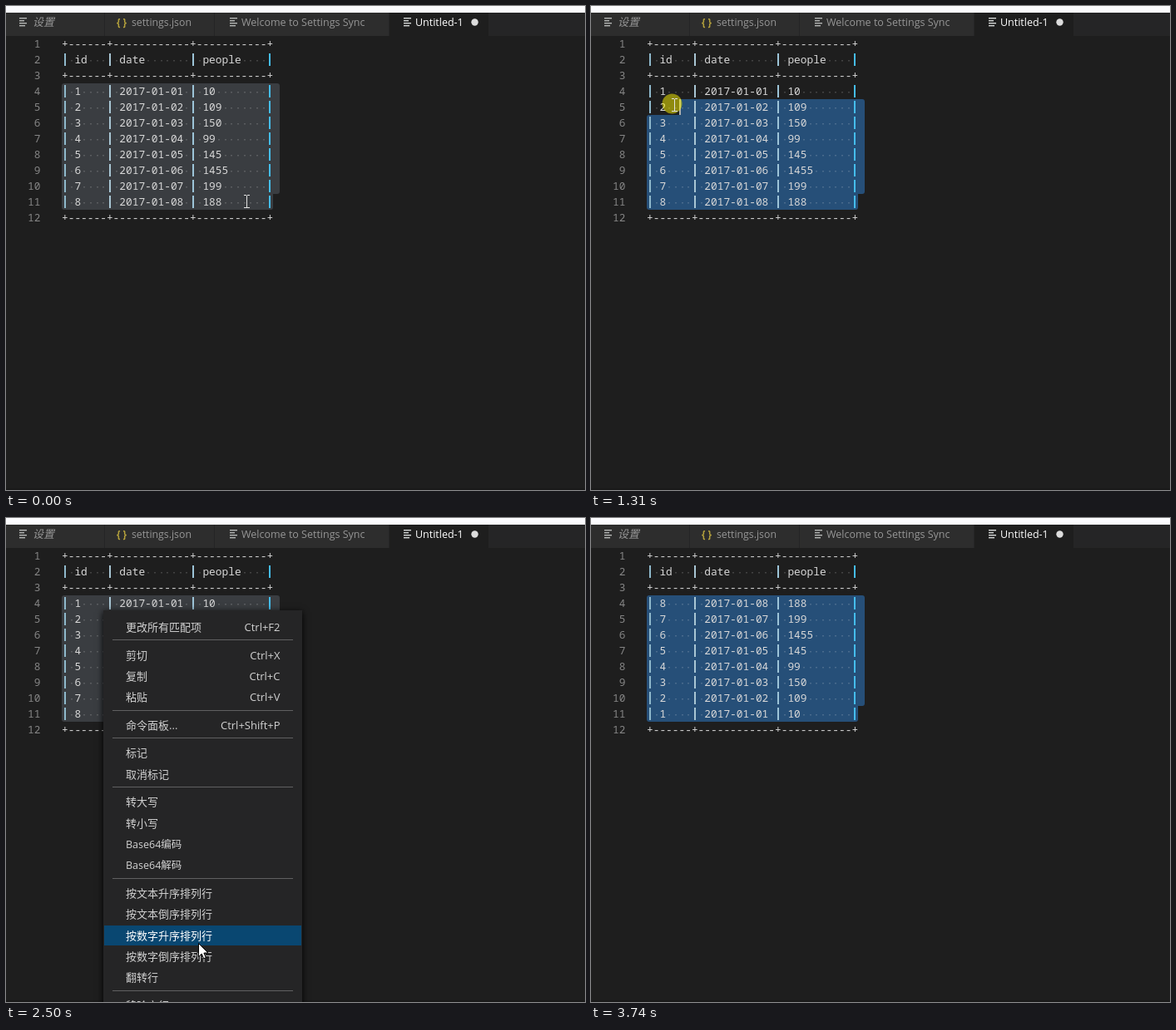
Animation of 696x582 px, one loop 3900 ms. Source, as an HTML page with a canvas:

```html
<!DOCTYPE html>
<html lang="zh">
<head>
<meta charset="utf-8">
<title>Sorting lines</title>
<style>
  html, body { margin: 0; width: 100%; height: 100%; overflow: hidden; background: #1e1e1e; }
  canvas { display: block; }
</style>
</head>
<body>
<canvas id="stage" width="696" height="582"></canvas>
<script>
const ctx = document.getElementById('stage').getContext('2d');
const LOOP = 3900, LEFT = 67, TOP = 36, CHAR = 7.7, LINE = 19, LAST = 11, END = 33;
const MONO = '12.83px "Noto Sans Mono", "DejaVu Sans Mono", monospace';
const ui = (size, style = '') =>
  `${style} ${size}px "Open Sans", "Noto Sans CJK SC", "Noto Sans CJK", sans-serif`;

const people = [10, 109, 150, 99, 145, 1455, 199, 188];
const rule = '+------+------------+-----------+';
const row = (id, date, n) => `| ${id.padEnd(5)}| ${date.padEnd(11)}| ${n.padEnd(10)}|`;
const data = people.map((n, i) => row(`${i + 1}`, `2017-01-0${i + 1}`, `${n}`));
const page = rows => [rule, row('id', 'date', 'people'), rule, ...rows, rule];
const ascending = page(data), reversed = page([...data].reverse());
const barColors = { 0: '#8fb9cc', 7: '#a9c6d4', 20: '#9dc4d8', 32: '#45bdec' };

const menuGroups = [
  [['更改所有匹配项', 'Ctrl+F2']],
  [['剪切', 'Ctrl+X'], ['复制', 'Ctrl+C'], ['粘贴', 'Ctrl+V']],
  [['命令面板...', 'Ctrl+Shift+P']],
  [['标记'], ['取消标记']],
  [['转大写'], ['转小写'], ['Base64编码'], ['Base64解码']],
  [['按文本升序排列行'], ['按文本倒序排列行'], ['按数字升序排列行'], ['按数字倒序排列行'], ['翻转行']],
  [['移除空行']]
];

// Each step changes only the listed parts. from/caret: [line, column]; at: pointer.
const steps = [
  [0, { at: [289, 235], kind: 'beam', ring: false, from: [4, 0], blue: false, caret: null, menu: false, text: ascending }],
  [70, { at: [285, 231] }],
  [220, { at: [326, 243] }],
  [300, { at: [360, 247], ring: true, from: null, caret: [12, END] }],
  [460, { at: [346, 238], ring: false }],
  [530, { at: [337, 232] }],
  [930, { at: [298, 229], ring: true, blue: true, from: [11, 30], caret: [11, 30] }],
  [1000, { at: [255, 209], from: [10, 25], caret: [10, 25] }],
  [1080, { at: [195, 180], from: [8, 17], caret: [8, 17] }],
  [1230, { at: [132, 142], from: [6, 9], caret: [6, 9] }],
  [1310, { at: [100, 119], from: [5, 5], caret: [5, 5] }],
  [1400, { at: [83, 106], from: [4, 2], caret: [4, 2] }],
  [1550, { at: [56, 97], kind: 'flipped', from: [4, 0], caret: [4, 0] }],
  [1720, { at: [51, 93] }],
  [1870, { at: [65, 101], kind: 'beam', ring: false, caret: null }],
  [2020, { at: [108, 109] }],
  [2100, { at: [117, 111], kind: 'arrow', blue: false, menu: true }],
  [2180, { at: [121, 115] }],
  [2260, { at: [142, 178] }],
  [2340, { at: [178, 318] }],
  [2420, { at: [218, 452] }],
  [2500, { at: [231, 511] }],
  [2650, { at: [226, 526] }],
  [2730, { at: [216, 547] }],
  [2820, { at: [211, 557] }],
  [3030, { ring: true }],
  [3110, { at: [213, 559], kind: 'beam', menu: false, blue: true, text: reversed, caret: [4, 0] }],
  [3190, { ring: false }],
  [3440, { at: [340, 568] }],
  [3520, { at: [477, 578] }],
  [3590, { at: null }],
  [3740, { caret: null }]
];

function stateAt(t) {
  const s = {};
  for (const [start, change] of steps) if (start <= t) Object.assign(s, change);
  return s;
}

const colX = c => LEFT + c * CHAR;
const lineY = n => TOP + (n - 1) * LINE;

function rect(x, y, w, h, color) {
  ctx.fillStyle = color;
  ctx.fillRect(x, y, w, h);
}

function label(str, x, y, color, font, align = 'left') {
  ctx.font = font;
  ctx.textAlign = align;
  ctx.fillStyle = color;
  ctx.fillText(str, x, y);
}

function listIcon(x, color) {
  [9, 6, 9, 7].forEach((w, i) => rect(x, 14 + i * 3, w, 1.4, color));
}

function drawTabs() {
  rect(0, 0, 696, 8, '#fbfbfe');
  rect(0, 8, 696, 28, '#252526');
  rect(0, 8, 118, 28, '#2d2d2d');
  rect(119, 8, 131, 28, '#2d2d2d');
  rect(251, 8, 209, 28, '#2d2d2d');
  rect(461, 8, 119, 28, '#1e1e1e');
  const dim = '#969696';
  listIcon(16, '#b4b6b5');
  label('设置', 32, 24, dim, ui(13, 'italic'));
  label('{ }', 133, 24, '#b5a23c', ui(11.5, 'bold'));
  label('settings.json', 151, 24, dim, ui(12.3));
  listIcon(269, '#b4b6b5');
  label('Welcome to Settings Sync', 283, 24, dim, ui(12.5));
  listIcon(478, '#d4d7d6');
  label('Untitled-1', 492, 24, '#ffffff', ui(12.5));
  ctx.beginPath();
  ctx.arc(563.5, 19.5, 4.2, 0, 7);
  ctx.fillStyle = '#dddddd';
  ctx.fill();
}

function block(x1, x2, y, corners, color) {
  ctx.beginPath();
  ctx.roundRect(x1, y, x2 - x1, LINE, corners);
  ctx.fillStyle = color;
  ctx.fill();
}

function drawSelection({ from, blue, text }) {
  if (!from) return;
  const [first, col] = from, color = blue ? '#264f78' : '#3a3d41';
  if (first === LAST) {
    const needle = text[LAST - 1].slice(col);
    text.forEach((str, i) => {
      for (let c = str.indexOf(needle); c >= 0; c = str.indexOf(needle, c + 1))
        block(colX(c), colX(c + needle.length), lineY(i + 1), 0, '#343a41');
    });
  }
  for (let n = first; n <= LAST; n++) {
    const top = n === first, end = n === LAST;
    const beforeEnd = n === LAST - 1;
    block(top ? Math.round(colX(col)) : LEFT, end ? 321 : 329, lineY(n), [
      top || (n === first + 1 && col > 0) ? 3 : 0,
      top ? 3 : 0,
      end || beforeEnd ? 3 : 0,
      end ? 3 : 0
    ], color);
  }
}

function drawText(text) {
  text.forEach((str, i) => {
    const y = lineY(i + 1);
    label(`${i + 1}`, 41.5, y + 14, '#858585', MONO, 'right');
    [...str].forEach((ch, c) => {
      const x = colX(c);
      if (ch === ' ') rect(Math.round(x + 3), y + 10, 2, 1.5, 'rgba(227,228,226,.19)');
      else if (ch === '|') rect(Math.floor(x + 3.2), y + 2, 2, 15, barColors[c]);
      else label(ch, x, y + 14, '#d8d8d8', MONO);
    });
  });
}

function drawMenu([, py]) {
  ctx.save();
  ctx.shadowColor = '#000';
  ctx.shadowBlur = 8;
  ctx.shadowOffsetY = 2;
  rect(117, 111, 239, 480, '#252526');
  ctx.restore();
  let y = 131;
  menuGroups.forEach((group, g) => {
    group.forEach(([name, keys], i) => {
      const mid = Math.round(y), hot = py > 118 && Math.abs(py - y) < 12.7;
      const color = hot ? '#ffffff' : '#d2d2d2';
      if (hot) rect(118, mid - 12, 237, 24, '#094771');
      label(name, 144, mid + 5, color, ui(name.startsWith('Base') ? 12.5 : 13));
      if (keys) label(keys, 329.5, mid + 5, color, ui(13), 'right');
      if (i < group.length - 1) y += 25.4;
    });
    if (g < menuGroups.length - 1) rect(128, Math.round(y + 15.4), 217, 1, '#606061');
    y += 33.5;
  });
}

function drawBeam(x, y) {
  const ink = '#e2e2e2';
  rect(x, y - 7, 1, 15, ink);
  for (const end of [y - 8, y + 7]) {
    rect(x - 3, end, 3, 1, ink);
    rect(x + 1, end, 3, 1, ink);
  }
}

function drawArrow(x, y, flip) {
  ctx.save();
  ctx.translate(x + 0.5, y + 0.5);
  ctx.scale(flip, 1);
  ctx.beginPath();
  [[0, 0], [0, 16], [3.7, 12.6], [6.2, 18.3], [8.8, 17.2], [6.4, 11.6], [11.4, 11.4]]
    .forEach(p => ctx.lineTo(...p));
  ctx.closePath();
  ctx.fillStyle = '#fff';
  ctx.strokeStyle = '#000';
  ctx.lineWidth = 1;
  ctx.fill();
  ctx.stroke();
  ctx.restore();
}

function drawPointer({ at, kind, ring }) {
  if (!at) return;
  const [x, y] = at;
  if (ring) {
    ctx.beginPath();
    ctx.arc(x - 2.5, y - 1.5, 12, 0, 7);
    ctx.fillStyle = 'rgba(255,246,0,.5)';
    ctx.fill();
  }
  if (kind === 'beam') drawBeam(x, y);
  else drawArrow(x, y, kind === 'flipped' ? -1 : 1);
}

function draw(t) {
  const s = stateAt(t);
  rect(0, 0, 696, 582, '#1e1e1e');
  rect(0, 580, 696, 2, '#191919');
  drawTabs();
  drawSelection(s);
  drawText(s.text);
  if (s.caret) rect(Math.round(colX(s.caret[1])), lineY(s.caret[0]), 2, LINE, '#aeafad');
  if (s.menu) drawMenu(s.at);
  drawPointer(s);
}

const begin = performance.now();
function tick() {
  draw((performance.now() - begin) % LOOP);
  requestAnimationFrame(tick);
}
tick();
</script>
</body>
</html>
```
